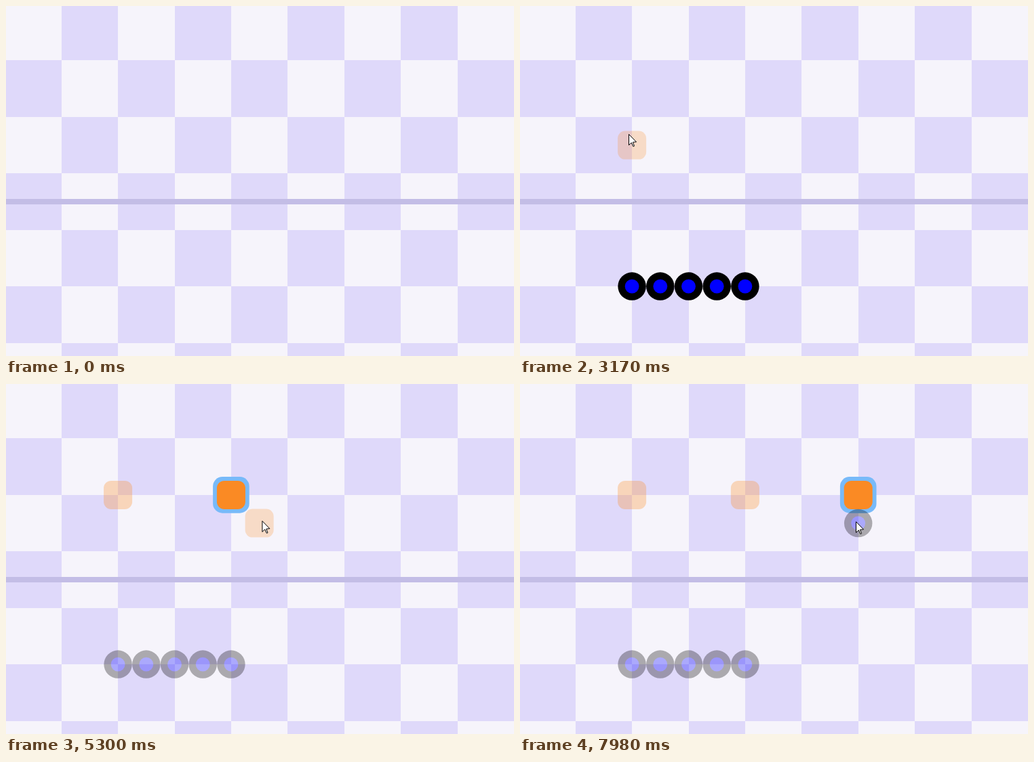
Animation of 749x517 px, one loop 8000 ms. Source, as an HTML page:

```html
<!DOCTYPE html>
<html lang="en">
<head>
<meta charset="utf-8">
<title>Board editor</title>
<style>
html, body { margin: 0; width: 100%; height: 100%; overflow: hidden; background: #f6f4fb; }
svg { display: block; }
</style>
</head>
<body>
<svg id="stage" width="749" height="517" viewBox="0 0 749 517"></svg>
<script>
const LOOP = 8000;
const CELL = 41.7;
const LEFT = 165.1, TOP = 163.9;
const ORANGE = '#fa8a24', BLUE = '#78baf9';
const DIM = 0.3;
const ENTER = 260, DRAG = 1030, DROP = 1790;
const stage = document.getElementById('stage');

function add(parent, tag, attrs = {}) {
  const el = document.createElementNS('http://www.w3.org/2000/svg', tag);
  for (const name in attrs) el.setAttribute(name, attrs[name]);
  parent.appendChild(el);
  return el;
}
const fade = (el, value) => el.setAttribute('opacity', value);
const move = (el, x, y) => el.setAttribute('transform', `translate(${x.toFixed(2)} ${y.toFixed(2)})`);
const mix = (a, b, u) => a + (b - a) * u;
const ramp = (t, start, length) => Math.min(1, Math.max(0, (t - start) / length));
const smooth = u => u * u * (3 - 2 * u);

// Board: each tile is two cells wide
const edgeX = i => Math.round(-1.6 + 83.4 * i);
const edgeY = j => Math.round(-3.3 + 83.5 * j);
for (let j = 0; j < 7; j++) {
  for (let i = 1 - j % 2; i < 9; i += 2) {
    add(stage, 'rect', {
      x: edgeX(i), y: edgeY(j), fill: '#dfd9fa',
      width: edgeX(i + 1) - edgeX(i), height: edgeY(j + 1) - edgeY(j)
    });
  }
}
add(stage, 'rect', { x: 0, y: 285, width: 749, height: 8, fill: '#c3bde6' });

// Pieces
function disc(parent) {
  const g = add(parent, 'g');
  add(g, 'circle', { r: CELL / 2 - 0.1 });
  add(g, 'circle', { r: CELL / 4, fill: '#00f' });
  return g;
}
function tile(parent, size, rx, fill) {
  return add(parent, 'rect', { x: -size / 2, y: -size / 2, width: size, height: size, rx, fill });
}
const box = parent => tile(parent, 42, 11, ORANGE);

const discs = [0, 1, 2, 3, 4].map(k => {
  const el = disc(stage);
  move(el, LEFT + k * CELL, TOP + 6 * CELL);
  return el;
});

const boxes = [3500, 4600, 5830].map((start, k) => {
  const g = add(stage, 'g');
  move(g, LEFT + 4 * k * CELL, TOP);
  return { g, halo: tile(g, 53.6, 14, BLUE), body: box(g), start };
});

const ghost = add(stage, 'g');
const ghostDisc = disc(ghost);
const ghostBox = box(ghost);

const press = add(stage, 'circle', { r: 12, fill: '#ffe800' });
const pointer = add(stage, 'path', {
  d: 'M.5 .5V16.5L4.3 12.9L6.9 18.5L8.6 17.8L6.4 12.2L11.5 11.8Z',
  fill: '#fff', stroke: '#000', 'stroke-linejoin': 'round'
});

// Pointer strokes: start, end, x, y and how far the path sags
const strokes = [
  [200, 890, 160, 418, 0],
  [DRAG, DROP, 350, 422, 0],
  [1860, 2620, 338, 414, -14],
  [2640, 3170, 160, 189, 15],
  [3170, 3450, 155, 166, 0],
  [4040, 4620, 339, 170, 50],
  [4740, 4890, 340, 160, 0],
  [5050, 5850, 500, 168, 48],
  [6540, 6930, 497, 160, 0],
  [7450, 7970, 495, 203, 0]
];

function pointerAt(t) {
  let x = 345, y = 530;
  for (const [start, end, toX, toY, sag] of strokes) {
    const u = ramp(t, start, end - start);
    x = mix(x, toX, smooth(u));
    y = mix(y, toY, smooth(u)) + sag * Math.sin(Math.PI * u);
    if (u < 1) break;
  }
  return [x, y];
}

// The ghost glides between the cells under the pointer.
function ghostAt(t) {
  const n = 16, glide = 90;
  const snap = (v, base) => base + CELL * Math.round((v - base) / CELL);
  let x = 0, y = 0;
  for (let k = 0; k < n; k++) {
    const [px, py] = pointerAt(t - glide * k / n);
    x += snap(px, LEFT) / n;
    y += snap(py, TOP) / n;
  }
  return [x, y];
}

function draw(t) {
  const [px, py] = pointerAt(t);
  const shown = t >= ENTER ? 1 : 0;
  const dragging = t >= DRAG && t < DROP + 50;
  const clicking = boxes.some(({ start }) => t >= start && t < start + 180);
  move(pointer, px, py);
  move(press, px, py);
  fade(pointer, shown);
  fade(press, dragging || clicking ? 0.52 : 0);

  const reach = t < DRAG ? 0 : t < DROP ? px : 749;
  const dim = mix(1, DIM, ramp(t, boxes[0].start, 350));
  discs.forEach((el, k) => fade(el, reach > LEFT + (k - 0.5) * CELL ? dim : 0));

  boxes.forEach(({ g, halo, body, start }, k) => {
    const next = boxes[k + 1];
    const on = ramp(t, start, 240);
    const off = next ? ramp(t, next.start, 240) ** 1.3 : 0;
    fade(g, t >= start ? 1 : 0);
    fade(halo, on * (1 - off));
    fade(body, mix(DIM, 1, on) * mix(1, DIM, off));
  });

  const toBox = ramp(t, 2450, 150), toDisc = ramp(t, 7100, 170);
  move(ghost, ...ghostAt(t));
  fade(ghost, shown);
  fade(ghostDisc, DIM * (1 - toBox + toDisc));
  fade(ghostBox, 0.24 * (toBox - toDisc));
}

const begin = performance.now();
function tick() {
  draw((performance.now() - begin) % LOOP);
  requestAnimationFrame(tick);
}
tick();
</script>
</body>
</html>
```
